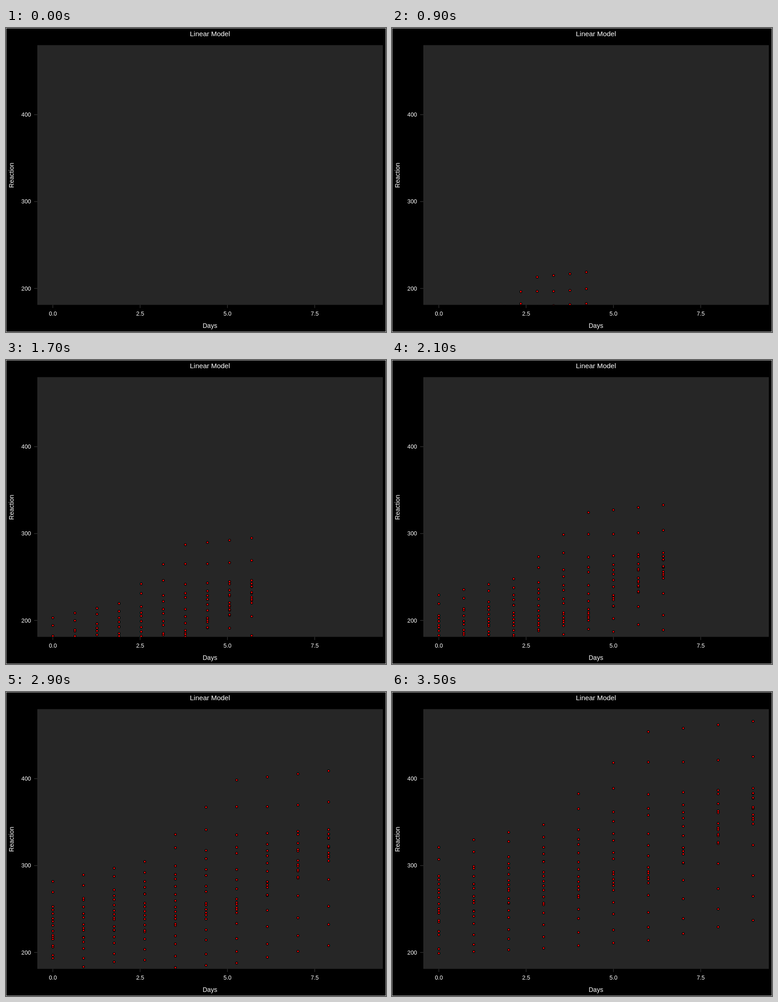
These frames come from a looping animation (837 px wide and 669 px high, 8 s). An HTML page with a canvas:

```html
<!DOCTYPE html>
<html lang="en">
<head>
<meta charset="utf-8">
<title>Linear Model</title>
<style>
html, body { margin: 0; width: 100%; height: 100%; overflow: hidden; background: #000; }
canvas { display: block; }
</style>
</head>
<body>
<canvas width="837" height="669"></canvas>
<script>
const ctx = document.querySelector('canvas').getContext('2d');
const LOOP = 8000, STEP = 100, STEPS = 49, FIRST = 14;
const DAYS = 10, SUBJECTS = 18, JITTER = 8;
const panel = [69, 37.7, 761, 571.6];

// Reaction at days 0, 3, 6 and 9 for a few subjects, ranked slowest last.
const quantiles = [
  { rank: 0, ms: [199, 205, 214, 237] },
  { rank: 4, ms: [235, 255, 280, 348] },
  { rank: 9, ms: [256, 282, 298, 366] },
  { rank: 15, ms: [288, 321, 382, 389] },
  { rank: 17, ms: [321, 347, 454, 466] }
];

const px = day => 103.2 + 76.9 * day;
const py = ms => 573.2 - 1.9125 * (ms - 200);
const mix = (a, b, f) => a + (b - a) * f;

let seed = 7;
function random() {
  seed = seed * 16807 % 2147483647;
  return seed / 2147483647;
}

function onDay(ms, day) {
  const i = Math.min(2, Math.floor(day / 3));
  return mix(ms[i], ms[i + 1], day / 3 - i);
}

function reaction(day, rank) {
  const i = Math.max(1, quantiles.findIndex(q => q.rank >= rank));
  const a = quantiles[i - 1], b = quantiles[i];
  const ms = mix(onDay(a.ms, day), onDay(b.ms, day), (rank - a.rank) / (b.rank - a.rank));
  const isKey = rank === a.rank || rank === b.rank;
  return isKey ? ms : ms + JITTER * (random() - 0.5);
}

const points = [];
for (let day = 0; day < DAYS; day++) {
  for (let rank = 0; rank < SUBJECTS; rank++) points.push({ day, ms: reaction(day, rank) });
}

function text(str, x, y, size, align = 'center') {
  ctx.font = `${size}px "Liberation Sans", Arial, sans-serif`;
  ctx.textAlign = align;
  ctx.fillStyle = '#fff';
  ctx.fillText(str, x, y);
}

function line(x1, y1, x2, y2) {
  ctx.beginPath();
  ctx.moveTo(x1, y1);
  ctx.lineTo(x2, y2);
  ctx.stroke();
}

function drawAxes() {
  ctx.fillStyle = '#000';
  ctx.fillRect(0, 0, 837, 669);
  ctx.strokeStyle = '#fff';
  ctx.lineWidth = 1.36;
  ctx.strokeRect(0, 0, 837, 669);
  ctx.fillStyle = '#262626';
  ctx.fillRect(...panel);

  ctx.strokeStyle = '#333';
  for (const ms of [200, 300, 400]) {
    line(62, py(ms), 69, py(ms));
    text(ms, 55, py(ms) + 4.5, 12.7, 'right');
  }
  for (const day of [0, 2.5, 5, 7.5]) {
    line(px(day), 609.3, px(day), 616.3);
    text(day.toFixed(1), px(day), 633.4, 12.7);
  }

  text('Linear Model', 449.2, 18.4, 15.3);
  text('Days', 449.2, 660, 14);
  ctx.save();
  ctx.translate(17, 324);
  ctx.rotate(-Math.PI / 2);
  text('Reaction', 0, 0, 14);
  ctx.restore();
}

// Every point travels in a straight line from the origin (0, 0).
function drawPoints(k) {
  ctx.save();
  ctx.beginPath();
  ctx.rect(...panel);
  ctx.clip();
  ctx.fillStyle = '#f00';
  ctx.strokeStyle = '#000';
  ctx.lineWidth = 1.2;
  for (const { day, ms } of points) {
    ctx.beginPath();
    ctx.arc(px(day * k), py(ms * k), 2.4, 0, 2 * Math.PI);
    ctx.fill();
    ctx.stroke();
  }
  ctx.restore();
}

const start = performance.now();
function frame() {
  const t = (performance.now() - start) % LOOP;
  const step = Math.min(STEPS, FIRST + Math.floor(t / STEP));
  drawAxes();
  drawPoints(step / STEPS);
  requestAnimationFrame(frame);
}
frame();
</script>
</body>
</html>
```
